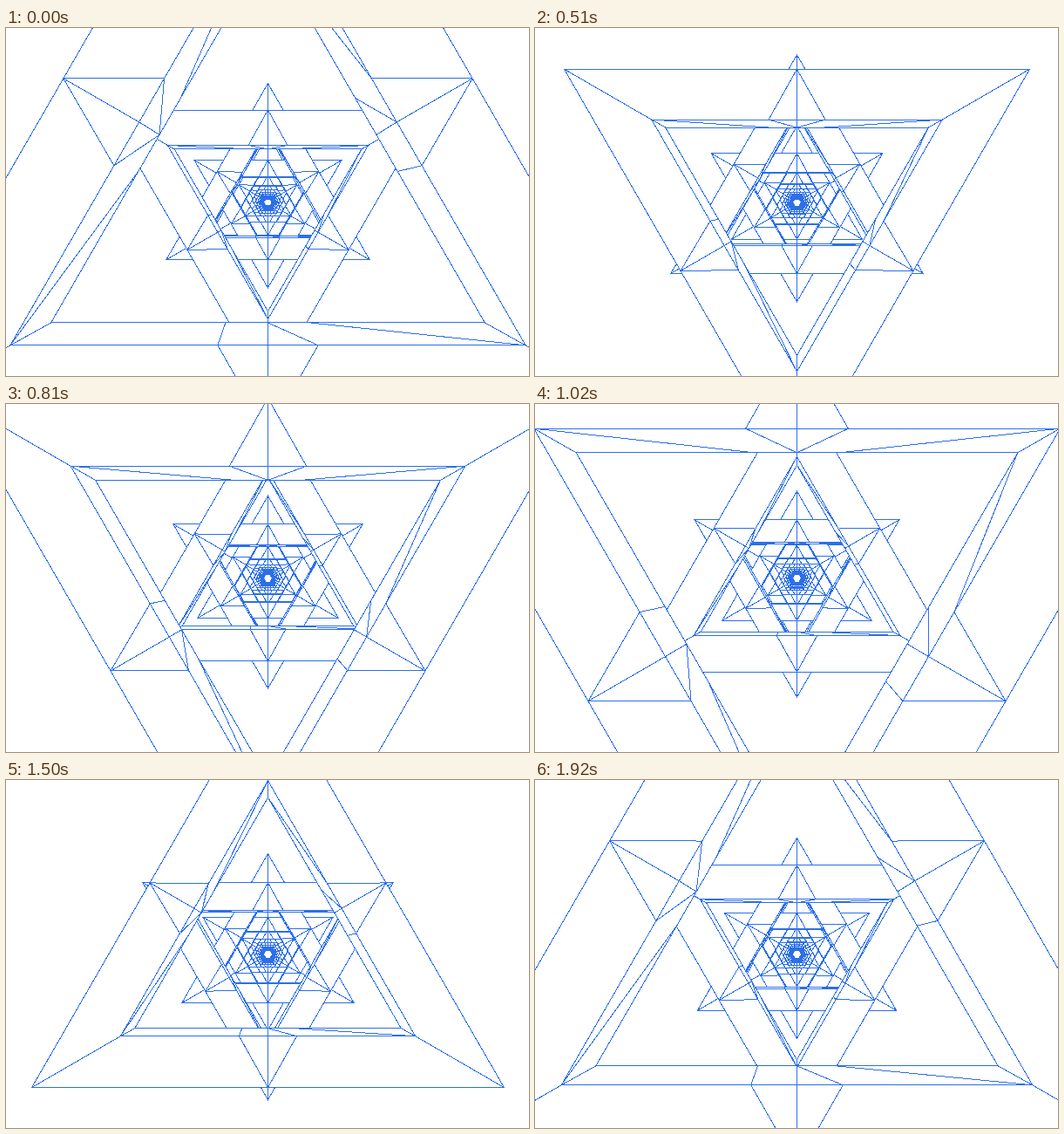
These frames come from a looping animation (600 by 399 pixels, 1.95 s). An HTML page:

```html
<!DOCTYPE html>
<html lang="en">
<head>
<meta charset="utf-8">
<title>Triangle tunnel</title>
<style>
  html, body { margin: 0; width: 100%; height: 100%; overflow: hidden; background: #fff; }
  svg { display: block; }
  path { fill: #fff; fill-rule: evenodd; stroke: #2d6fe8; stroke-width: 1; shape-rendering: crispEdges; }
</style>
</head>
<body>
<svg id="stage" width="600" height="399" viewBox="0 0 600 399"></svg>
<script>
const CX = 300.5, CY = 200;
const STEP_MS = 30, STEPS = 65;
const SPEED = 0.0001368;          // depth travelled per step
const SPACING = SPEED * 66;       // depth between rings of the same orientation
const PAIRS = 14;
const THICK = 0.00055, RIM_DEPTH = 0.00006, RIM = 1.62;
const CORNER = Math.sqrt(3) / 2, W = 0.169;

// Extra struts on the inner wall of each side: [front position, back position]
const STRUTS = [
  [[-W, -W], [W, 0], [CORNER, W]],
  [[-W, 0], [W, 0], [CORNER, W], [-CORNER, -W]],
  [[-W, -W], [W, CORNER], [0, W]]
];

const stage = document.getElementById('stage');
const rings = [];
for (let k = PAIRS - 1; k >= 0; k--) {
  addRing(0.00752 + k * SPACING, 150, 0.007);
  addRing(0.00293 + k * SPACING, 90, -0.02);
}

function addRing(depth, angle, shift) {
  const path = document.createElementNS('http://www.w3.org/2000/svg', 'path');
  stage.appendChild(path);
  rings.push({ path, depth, angle, shift });
}

function ringPath(z, angle, shift) {
  const project = (side, scale, along, depth) => {
    const a = (angle + side * 120) * Math.PI / 180;
    const c = Math.cos(a), s = Math.sin(a), r = scale / 2;
    const x = CX + (r * c + along * scale * s) / depth;
    const y = CY + (r * s - along * scale * c + shift) / depth;
    return x.toFixed(2) + ' ' + y.toFixed(2);
  };
  const rim = (i, p) => project(i, RIM, p, z + RIM_DEPTH);
  const front = (i, p) => project(i, 1, p, z);
  const back = (i, p) => project(i, 1, p, z + THICK);
  const triangle = at => 'M' + [0, 1, 2].map(i => at(i, CORNER)).join('L') + 'Z';
  const line = (p, q) => 'M' + p + 'L' + q;

  let d = triangle(rim) + triangle(back);
  STRUTS.forEach((struts, i) => {
    d += line(front(i, -CORNER), front(i, CORNER));
    for (const p of [0, CORNER]) {
      d += line(rim(i, p), front(i, p)) + line(front(i, p), back(i, p));
    }
    for (const p of [-W, W]) d += line(rim(i, 0), front(i, p));
    for (const [p, q] of struts) d += line(front(i, p), back(i, q));
  });
  return d;
}

let shown = -1;
function draw(now) {
  const step = Math.floor(now / STEP_MS) % STEPS;
  if (step !== shown) {
    shown = step;
    for (const { path, depth, angle, shift } of rings) {
      const z = depth - step * SPEED;
      path.setAttribute('d', z > 0.0003 ? ringPath(z, angle, shift) : '');
    }
  }
}

const start = performance.now();
function tick() {
  draw(performance.now() - start);
  requestAnimationFrame(tick);
}
tick();
</script>
</body>
</html>
```
